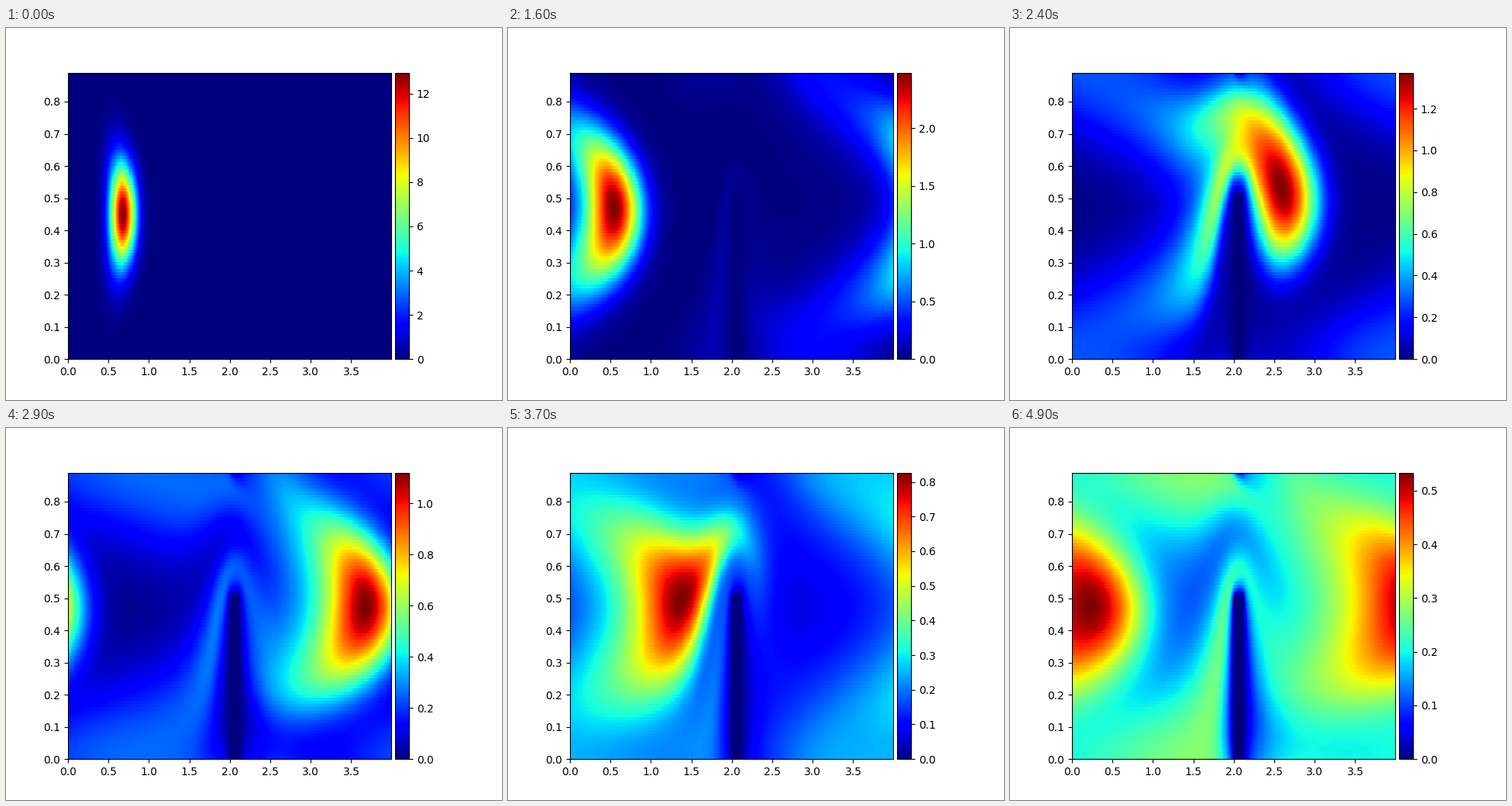
Animation of 640x480 px, one loop 5000 ms. Source, as a matplotlib script:

```python
import numpy as np
import matplotlib.pyplot as plt
from matplotlib.animation import FuncAnimation

# Space is in axis units, time in animation frames.
NX, NY, H = 400, 90, 0.01
FRAMES, STEPS = 50, 160
SPEED = 0.23            # centreline speed far from the barrier
DIFFUSION = 0.00114
WALL_LEAK = 0.08        # weak exchange between top and bottom walls
START, SIGMA = (0.45, 0.45), 0.1
BAR_X, BAR_TOP = (200, 211), 51


def stream_function():
    """Creeping flow past the barrier, on cell corners, periodic in x."""
    eta = np.arange(NY + 1) / NY
    base = SPEED * NY * H / 1.5 * (3 * eta**2 - 2 * eta**3)

    m = NY - 1
    d2 = np.eye(m, k=1) + np.eye(m, k=-1) - 2 * np.eye(m)
    d4 = d2 @ d2
    d4[0, 0] += 2       # no slip at both walls
    d4[-1, -1] += 2
    lam = 2 * np.cos(2 * np.pi * np.arange(NX // 2 + 1) / NX) - 2
    lam = lam[:, None, None]
    modes = np.linalg.inv(lam**2 * np.eye(m) + 2 * lam * d2 + d4)
    green = np.fft.irfft(modes, n=NX, axis=0)

    # Forces on the barrier nodes that bring the stream function to zero there.
    ox, oy = np.meshgrid(np.arange(BAR_X[0], BAR_X[1] + 1),
                         np.arange(1, BAR_TOP + 1), indexing="ij")
    ox, oy = ox.ravel(), oy.ravel()
    response = green[(ox[:, None] - ox) % NX, oy[:, None] - 1, oy - 1]
    force = np.zeros((NX, m))
    force[ox, oy - 1] = np.linalg.solve(response, -base[oy])
    phi_hat = np.einsum("kij,kj->ki", modes, np.fft.rfft(force, axis=0))
    phi = np.fft.irfft(phi_hat, n=NX, axis=0)
    return base + np.pad(phi, ((0, 0), (1, 1)))


def transport_weights(psi):
    """Five-point weights for advection and diffusion over one time step."""
    u = np.diff(psi, axis=1) / H
    v = -(np.roll(psi, -1, axis=0) - psi) / H
    bar = slice(*BAR_X)
    k = np.full((NX, NY + 1), DIFFUSION)
    k[:, [0, -1]] *= WALL_LEAK
    k[bar, [0, -1]] = DIFFUSION

    west = u / (2 * H) + DIFFUSION / H**2
    east = -np.roll(u, -1, axis=0) / (2 * H) + DIFFUSION / H**2
    south = v[:, :-1] / (2 * H) + k[:, :-1] / H**2
    north = -v[:, 1:] / (2 * H) + k[:, 1:] / H**2
    weights = [west, east, south, north]
    weights.append(-sum(weights))
    fluid = np.ones((NX, NY))
    fluid[bar, :BAR_TOP] = 0
    return [(w * fluid / STEPS).astype(np.float32) for w in weights]


def simulate():
    west, east, south, north, centre = transport_weights(stream_function())
    x = (np.arange(NX) + 0.5)[:, None] * H
    y = (np.arange(NY) + 0.5)[None, :] * H
    r2 = (x - START[0])**2 + (y - START[1])**2
    blob = np.exp(-r2 / (2 * SIGMA**2)) / (2 * np.pi * SIGMA**2)
    blob[BAR_X[0]:BAR_X[1], :BAR_TOP] = 0

    p = np.zeros((NX + 2, NY + 2), dtype=np.float32)
    c = p[1:-1, 1:-1]
    c[:] = blob
    last = None
    states = []
    for _ in range(FRAMES):
        for _ in range(STEPS):
            p[0], p[-1] = p[-2], p[1]
            p[:, 0], p[:, -1] = p[:, -2], p[:, 1]
            rate = centre * c
            rate += west * p[:-2, 1:-1]
            rate += east * p[2:, 1:-1]
            rate += south * p[1:-1, :-2]
            rate += north * p[1:-1, 2:]
            if last is None:
                last = rate
            c += np.float32(1.5) * rate - np.float32(0.5) * last
            last = rate
        states.append(c[:-1, :-1].T.copy())
    return states


states = simulate()

fig, ax = plt.subplots(figsize=(6.4, 4.8), dpi=100)
image = ax.imshow(states[0], cmap="jet", origin="lower", aspect="auto",
                  interpolation="nearest", vmin=0, vmax=states[0].max(),
                  extent=(0, (NX - 1) * H, 0, (NY - 1) * H))
fig.colorbar(image, ax=ax, pad=0.01)


def update(i):
    image.set_data(states[i])
    image.set_clim(0, states[i].max())
    return [image]


anim = FuncAnimation(fig, update, frames=FRAMES, interval=100, repeat=True,
                     repeat_delay=0, blit=False)
plt.show()
```
